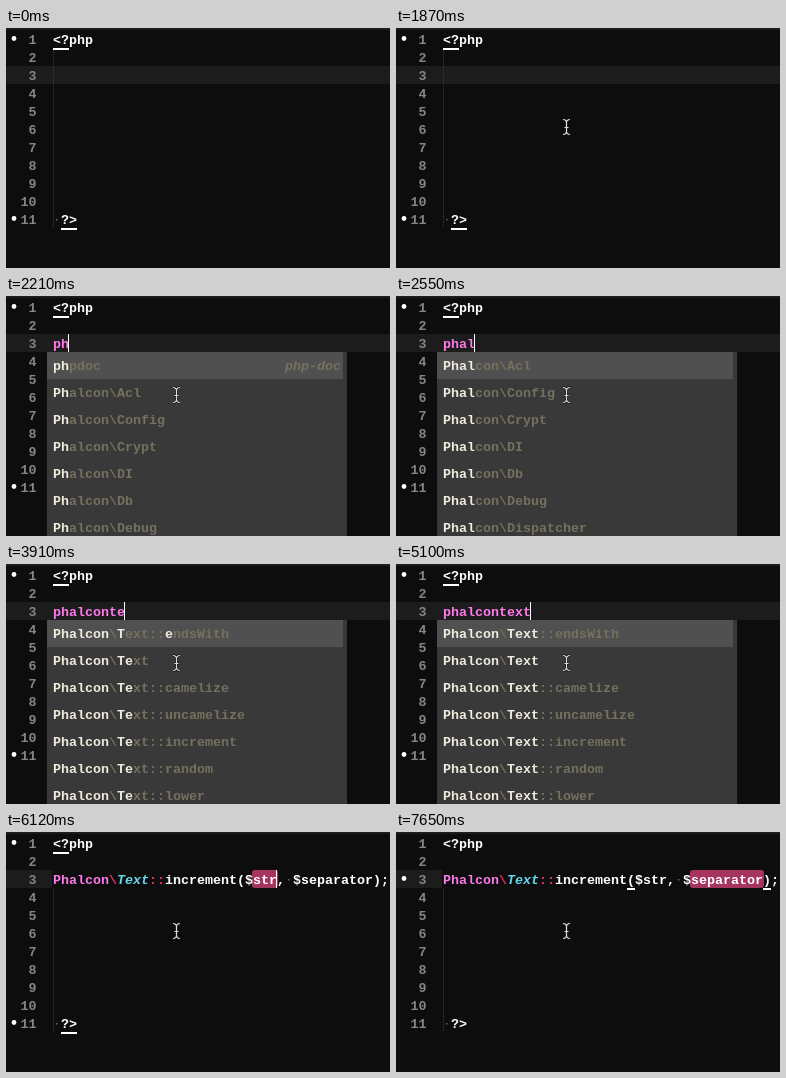
Recreate the animation shown at these times as an HTML page. Size 384 by 240 pixels, loop 7990 ms.

```html
<!DOCTYPE html>
<html lang="en">
<head>
<meta charset="utf-8">
<title>Code completion</title>
<style>
  html, body { margin: 0; width: 100%; height: 100%; overflow: hidden; background: #0d0d0d; }
  svg { display: block; width: 384px; height: 240px; }
  text { font: 700 13.333px "Liberation Mono", "DejaVu Sans Mono", monospace; white-space: pre; }
  .italic { font-style: italic; }
</style>
</head>
<body>
<svg id="stage" viewBox="0 0 384 240"></svg>
<script>
const STEP = 170, COUNT = 47, CHAR = 8, LEFT = 47, LINE = 18, ROW = 27;
const WHITE = '#ffffff', DIM = '#75715e', LIT = '#efebdd', GREY = '#858585';
const PINK = '#ff78ec', RED = '#f92672', CYAN = '#66d9ef';

const escape = s => s.replace(/&/g, '&amp;').replace(/</g, '&lt;');
const rect = (x, y, w, h, fill, more = '') =>
  `<rect x="${x}" y="${y}" width="${w}" height="${h}" fill="${fill}" ${more}/>`;
const text = (x, y, s, fill, more = '') =>
  `<text x="${x}" y="${y}" fill="${fill}" ${more}>${escape(s)}</text>`;
const column = n => LEFT + n * CHAR;
const lineTop = n => 2 + (n - 1) * LINE;
const baseline = n => lineTop(n) + 14;
const underline = (x, n, chars) => rect(x, lineTop(n) + 18, chars * CHAR, 2, WHITE);
const bullet = n => `<circle cx="8" cy="${lineTop(n) + 8.5}" r="2.4" fill="${WHITE}"/>`;

// Asterisks enclose the matched letters of a suggestion.
const classes = ['Acl', 'Config', 'Crypt', 'DI', 'Db', 'Debug', 'Dispatcher'];
const methods = ['::endsWith', '', '::camelize', '::uncamelize', '::increment', '::random', '::lower'];
const tags = ['', 're', 'su', 'aram', 'hpdoc', 'icture', 'rogress'];
const hints = ['<p>', '<pre>', 'PyroCMS uploaded file site url.', '<param>', 'php-doc', '<picture>', '<progress>'];
const textRows = n => methods.map(m => `*Phalcon*\\*${'Text'.slice(0, n)}*${'Text'.slice(n)}${m}`);

function suggestions(query) {
  const n = query.length;
  if (n === 1) return tags.map(tag => `*p*${tag}`);
  if (n <= 7) {
    const rows = classes.map(c => `*${'Phalcon'.slice(0, n)}*${'Phalcon'.slice(n)}\\${c}`);
    return n === 2 ? ['*ph*pdoc', ...rows.slice(0, 6)] : rows;
  }
  if (n === 8) return ['Tag', 'Text', 'Tag\\Exception', 'Tag\\Select', 'Translate', 'Text::random', 'Text::lower']
    .map(c => `*Phalcon*\\*T*${c.slice(1)}`);
  if (n === 9) return ['*Phalcon*\\*T*ext::*e*ndsWith', ...textRows(2).slice(1)];
  if (n <= 11) return textRows(n - 7);
  const exception = '*Ex*cep*ti*o*n*';
  return [
    n === 12 ? '*Phalcon*\\*Text*::*i*ncrement' : '*Phalcon*\\*Text*::*in*crement',
    '*Phalcon*\\*Text*::RANDOM_*N*UMER*I*C',
    '*Phalcon*\\*Text*::u*n*camel*i*ze',
    '*Phalcon*\\*Text*::e*n*dsW*i*th',
    `*Phalcon*\\*T*ag\\${exception}`,
    `*Phalcon*\\*T*ranslate\\${exception}`,
    `*Phalcon*\\Mvc\\Model\\*T*ransactio…${exception}`
  ];
}

function popup(query) {
  const n = query.length;
  const wide = n < 2 || n > 11;
  const width = wide ? 312 : 300;
  let out = rect(41, 56, width, 184, '#393939');
  if (n > 1) out += rect(41, 56, wide ? width : width - 4, ROW, '#505050');
  out += `<clipPath id="rows">${rect(41, 56, width - 4, 184, WHITE)}</clipPath><g clip-path="url(#rows)">`;
  suggestions(query).forEach((row, i) => {
    const y = 74 + i * ROW;
    const runs = row.split('*')
      .map((run, k) => `<tspan fill="${k % 2 ? LIT : DIM}">${run}</tspan>`).join('');
    out += `<text x="${LEFT}" y="${y}">${runs}</text>`;
    const hint = n === 1 ? hints[i] : n === 2 && i === 0 ? 'php-doc' : '';
    if (hint) out += text(335, y, hint, DIM, 'text-anchor="end" class="italic"');
  });
  return out + '</g>';
}

function callLine([start, chars]) {
  let out = rect(column(start) - 1, lineTop(3), chars * CHAR + 2, LINE, '#a5355f', 'rx="3"');
  const runs = [['Phalcon', PINK], ['\\', RED], ['Text', CYAN], ['::', RED], ['increment($str, $separator);', WHITE]];
  let at = 0;
  for (const [run, fill] of runs) {
    out += text(column(at), baseline(3), run, fill, fill === CYAN ? 'class="italic"' : '');
    at += run.length;
  }
  return out + rect(column(29) + 3, lineTop(3) + 9, 1.5, 1.5, '#666');
}

function pointer([x, y]) {
  const d = `M${x - 3.5} ${y - 7.5}q3 0 3.5 2.5q.5 -2.5 3.5 -2.5M${x} ${y - 5}v10` +
    `M${x - 3.5} ${y + 7.5}q3 0 3.5 -2.5q.5 2.5 3.5 2.5M${x - 2} ${y + .5}h4`;
  return `<path d="${d}" fill="none" stroke="#111" stroke-width="2.6"/>` +
    `<path d="${d}" fill="none" stroke="#ddd" stroke-width="1.2"/>`;
}

function draw({ mouse, query, field, caret, inside }) {
  // A selection leaves only the gutter part of the line highlighted.
  let out = rect(0, 0, 384, 240, '#0d0d0d') + rect(0, 0, 384, 2, '#1c1c1c') +
    rect(0, lineTop(3), field ? LEFT - 1 : 384, LINE, '#1c1c1c');
  for (let n = 1; n <= 11; n++) {
    out += text(30.5, baseline(n), String(n), GREY, 'text-anchor="end"');
  }
  const guide = query || field ? 56 : 22;
  out += `<path d="M47.5 ${guide}V200" stroke="#3a3a3a" stroke-dasharray="1 1"/>`;
  out += text(LEFT, baseline(1), '<?php', WHITE) + text(column(1), baseline(11), '?>', WHITE) +
    rect(50, lineTop(11) + 9, 1.5, 1.5, '#666');
  out += inside ? bullet(3)
    : bullet(1) + bullet(11) + underline(LEFT, 1, 2) + underline(column(1), 11, 2);
  if (field) out += callLine(field);
  if (inside) out += underline(column(23), 3, 1) + underline(column(40), 3, 1);
  if (query) out += text(LEFT, baseline(3), query, PINK) + popup(query);
  const caretColumn = field ? field[0] + field[1] : query.length;
  if (caret) out += rect(column(caretColumn) - (caretColumn ? 1 : 0), lineTop(3), 1, LINE, WHITE, `opacity="${caret}"`);
  if (mouse) out += pointer(mouse);
  return out;
}

// Each entry changes the state from the given step on.
const word = 'phalcontextin';
const typed = n => ({ query: word.slice(0, n), caret: 1 });
const caret = opacity => ({ caret: opacity });
const changes = {
  0: { mouse: null, query: '', field: null, caret: 0, inside: false },
  4: { mouse: [171, 120] },
  5: { mouse: [175, 102] },
  7: { mouse: [170.5, 99], caret: 1 },
  9: caret(.6), 10: caret(.3), 11: caret(0),
  12: typed(1), 13: typed(2), 14: typed(3), 15: typed(4),
  16: typed(5), 17: typed(6), 18: typed(7), 19: typed(8), 20: typed(9),
  21: caret(.5), 23: caret(1),
  24: typed(10), 25: typed(11),
  27: caret(.5), 28: caret(0), 29: caret(.5), 30: caret(1),
  31: typed(12), 32: typed(13),
  33: caret(.7), 34: caret(.4), 35: caret(.1),
  36: { query: '', field: [25, 3], caret: 1 },
  38: { inside: true },
  39: caret(.5), 40: caret(0),
  41: { field: [31, 9], caret: .7 }, 42: caret(1),
  44: caret(.5), 45: caret(0)
};
const states = [];
for (let i = 0; i < COUNT; i++) states.push({ ...states[i - 1], ...changes[i] });

const stage = document.getElementById('stage');
let shown = null;
function tick() {
  const state = Math.floor(performance.now() / STEP) % COUNT;
  if (state !== shown) {
    stage.innerHTML = draw(states[state]);
    shown = state;
  }
  requestAnimationFrame(tick);
}
tick();
</script>
</body>
</html>
```
